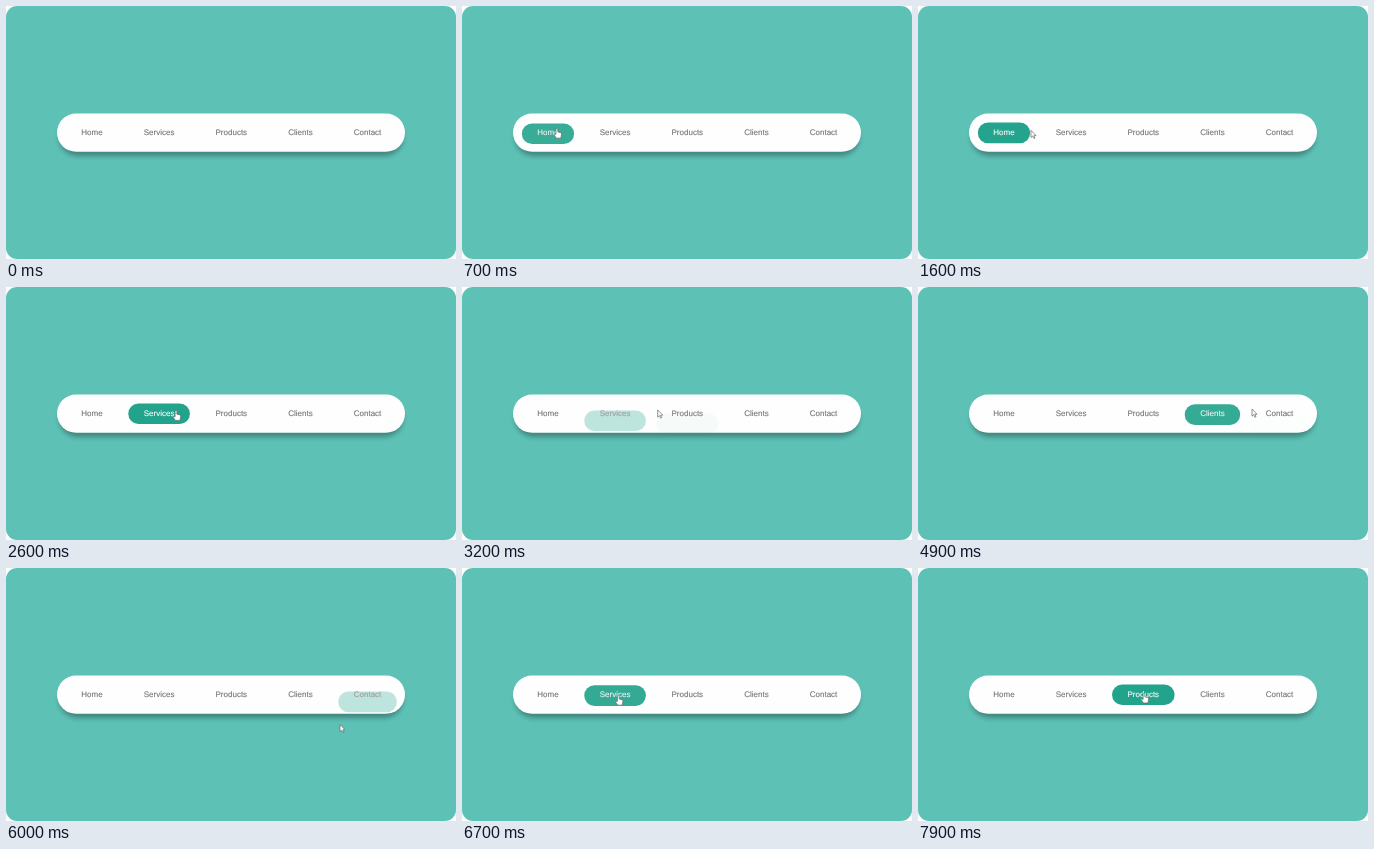
An HTML page for the animation above (8000 ms loop, 450 by 253 pixels).

```html
<!DOCTYPE html>
<html lang="en">
<head>
<meta charset="utf-8">
<title>Navigation bar hover</title>
<style>
  html, body { margin: 0; width: 100%; height: 100%; overflow: hidden; background: #fff; }
  svg { display: block; width: 100vw; height: 100vh; }
  text {
    font: 8px "Liberation Sans", Arial, sans-serif;
    text-rendering: geometricPrecision;
    fill: currentColor; stroke: currentColor; stroke-width: .12;
  }
  .shadow { opacity: .3; filter: blur(2.8px); }
  .pill { fill: #22a38c; }
  #cursor path { fill: #fff; stroke: #666; stroke-width: .7; stroke-linejoin: round; }
</style>
</head>
<body>
<svg viewBox="0 0 450 253">
  <rect width="450" height="253" rx="11" fill="#5dc1b6"/>
  <rect class="shadow" x="53" y="113" width="344" height="37" rx="18.5"/>
  <rect x="51" y="107.5" width="348" height="38.3" rx="19.15" fill="#fefefe"/>
  <g id="menu"></g>
  <g id="cursor">
    <path id="arrow" d="M0 0V7.2L1.7 5.7L2.9 8.2L4 7.7L2.9 5.3H5Z"/>
    <path id="hand" d="M-.9 .6C-.9-.3 .9-.3 .9 .6V3.5L3.9 4.2Q4.8 4.5 4.7 5.5L4 9.7H-.6L-3 6.1Q-2.6 5-.9 6.1Z"/>
  </g>
</svg>
<script>
const LOOP = 8000, TICK = 100, FADE = 300;
const LEFT = 59.8, TOP = 116.5, HEIGHT = 20.6, PAD = 15.5, GAP = 10.1, RISE = 10;
const ICON_DELAY = 20; // the hand appears a little after the hover begins

// Turning points of the pointer: time, x, y
const PATH = [
  [300, 96, 92], [560, 94, 122], [1500, 100, 125], [1600, 113, 124.3],
  [2600, 170, 123.7], [3000, 177, 123], [4000, 270.5, 122.5], [4850, 314, 122],
  [4900, 334, 122], [5800, 352, 126], [6000, 334, 156.5], [6200, 290, 163],
  [6600, 150, 128], [6950, 172, 126], [7500, 226, 125.3], [LOOP, 226, 125.3]
];

const $ = id => document.getElementById(id);
const mix = (a, b, k) => a + (b - a) * k;

function add(tag, attrs) {
  const el = document.createElementNS("http://www.w3.org/2000/svg", tag);
  for (const key in attrs) el.setAttribute(key, attrs[key]);
  return $("menu").appendChild(el);
}

// The CSS "ease" curve, cubic-bezier(.25, .1, .25, 1)
function ease(x) {
  if (x <= 0) return 0;
  if (x >= 1) return 1;
  const bez = (a, b, s) => 3 * a * s * (1 - s) ** 2 + 3 * b * s * s * (1 - s) + s ** 3;
  let lo = 0, hi = 1;
  for (let i = 0; i < 24; i++) {
    const mid = (lo + hi) / 2;
    if (bez(.25, .25, mid) < x) lo = mid; else hi = mid;
  }
  return bez(.1, 1, lo);
}

function pointer(t) {
  const i = PATH.findIndex(p => p[0] > t);
  const [t0, x0, y0] = PATH[i - 1], [t1, x1, y1] = PATH[i];
  const k = (t - t0) / (t1 - t0);
  return [mix(x0, x1, k), mix(y0, y1, k)];
}

// Times at which the pointer enters and leaves a pill
function hovers(x, width) {
  const spans = [];
  let inside = false;
  for (let t = PATH[0][0]; t < LOOP; t += 2) {
    const [px, py] = pointer(t);
    const hit = px > x && px < x + width && py > TOP && py < TOP + HEIGHT;
    if (hit && !inside) spans.push({ start: t, end: Infinity });
    if (!hit && inside) spans[spans.length - 1].end = t;
    inside = hit;
  }
  return spans;
}

let x = LEFT;
const items = ["Home", "Services", "Products", "Clients", "Contact"].map(name => {
  const pill = add("rect", { class: "pill", x, y: TOP, height: HEIGHT, rx: HEIGHT / 2 });
  const label = add("text", { x: x + PAD, y: 129.4 });
  label.textContent = name;
  const width = label.getComputedTextLength() + 2 * PAD;
  pill.setAttribute("width", width);
  const spans = hovers(x, width);
  x += width + GAP;
  return { pill, label, spans };
});

function draw(t) {
  let over = false;
  for (const { pill, label, spans } of items) {
    let p = 0;
    for (const { start, end } of spans) {
      p += ease((t - start) / FADE) - ease((t - end) / FADE);
      if (t > start + ICON_DELAY && t < end) over = true;
    }
    const grey = mix(116, 255, p);
    pill.setAttribute("opacity", p);
    pill.setAttribute("transform", `translate(0 ${RISE * (1 - p)})`);
    label.style.color = `rgb(${grey},${grey},${grey})`;
  }
  const shown = t >= PATH[0][0];
  $("cursor").style.display = shown ? "" : "none";
  if (shown) $("cursor").setAttribute("transform", `translate(${pointer(t)})`);
  $("hand").style.display = over ? "" : "none";
  $("arrow").style.display = over ? "none" : "";
}

const begin = performance.now();
function frame() {
  const t = (performance.now() - begin) % LOOP;
  draw(Math.floor(t / TICK) * TICK);
  requestAnimationFrame(frame);
}
frame();
</script>
</body>
</html>
```
